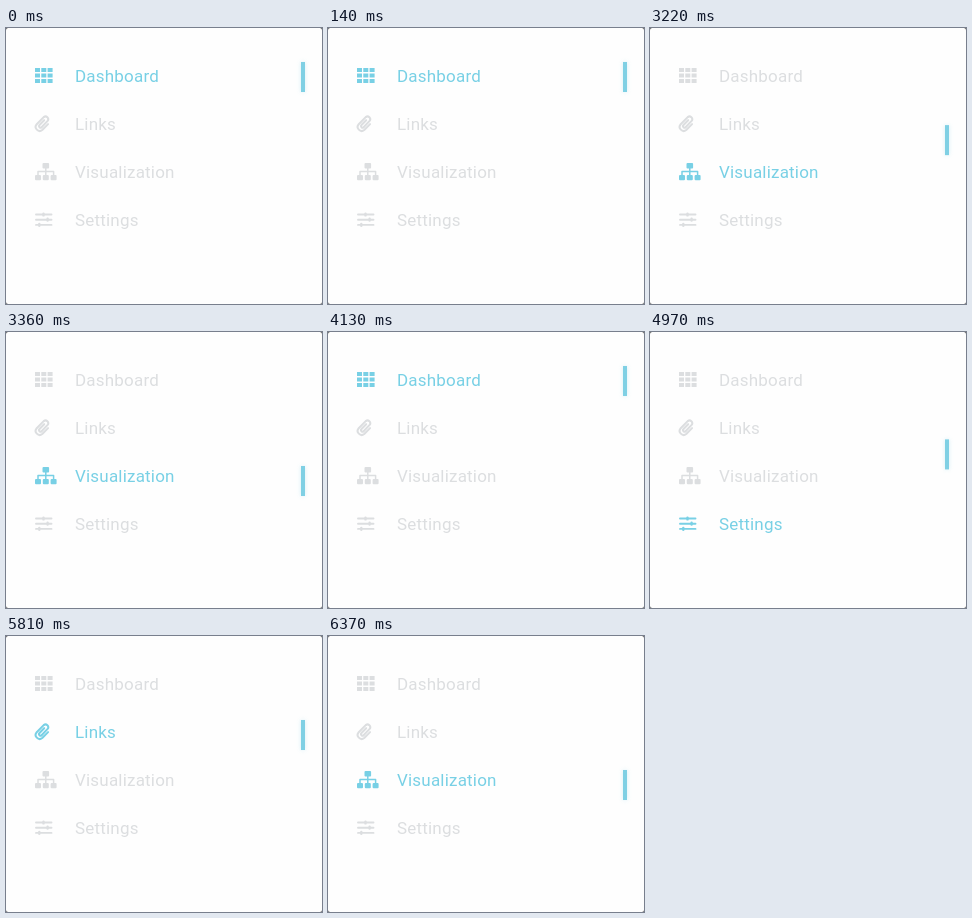
Recreate the animation shown at these times as an HTML page. Size 316 by 276 pixels, loop 7.49 s.

```html
<!DOCTYPE html>
<html lang="en">
<head>
<meta charset="utf-8">
<title>Menu</title>
<style>
  html, body { margin: 0; width: 100%; height: 100%; overflow: hidden; background: #666; }
  svg { display: block; width: 316px; height: 276px; }
  text { font: 17px Roboto, sans-serif; letter-spacing: .2px; }
  g { color: #dcdee0; fill: currentColor; }
  g.on { color: #78d0e5; }
  .line { fill: none; stroke: currentColor; stroke-width: 1.9; stroke-linecap: round; stroke-linejoin: round; }
  #bar { fill: #7fd0e4; filter: drop-shadow(0 0 2px #7fd0e455); }
</style>
</head>
<body>
<svg viewBox="0 0 316 276">
  <rect width="316" height="276" rx="2.5" fill="#fefefe"/>
  <g>
    <path d="M29 40h5v4h-5zm6.3 0h5v4h-5zm6.3 0h5v4h-5zM29 45.5h5v4h-5zm6.3 0h5v4h-5zm6.3 0h5v4h-5zM29 51h5v4h-5zm6.3 0h5v4h-5zm6.3 0h5v4h-5z"/>
    <text x="69" y="54">Dashboard</text>
  </g>
  <g>
    <path class="line" transform="translate(28.6 87.2) scale(1.06)" d="M12.7 8.4 7.2 14A3.8 3.8 0 0 1 2 8.5L8.6 1.8A2.6 2.6 0 0 1 12.3 5.4L6.6 11.3A1.4 1.4 0 0 1 4.6 9.3L9 4.7"/>
    <text x="69" y="102">Links</text>
  </g>
  <g>
    <rect x="36.5" y="135" width="6.6" height="5.5" rx="1"/>
    <rect x="29" y="147" width="6" height="5.2" rx="1"/>
    <rect x="36.8" y="147" width="6" height="5.2" rx="1"/>
    <rect x="44.6" y="147" width="6" height="5.2" rx="1"/>
    <path class="line" style="stroke-width:1.5" d="M39.8 140v7M32 147v-3.4h15.6v3.4"/>
    <text x="69" y="150">Visualization</text>
  </g>
  <g>
    <path class="line" d="M30 186.5h15.5M30 191.7h15.5M30 196.9h15.5"/>
    <path class="line" style="stroke-width:2.4" d="M37.5 185.6v1.8M41.6 190.8v1.8M33.3 196v1.8"/>
    <text x="69" y="198">Settings</text>
  </g>
  <rect id="bar" x="295" width="4" height="30"/>
</svg>
<script>
  const LOOP = 7490, TICK = 70, MOVE = 140;
  // [time of the switch, menu item, how long the bar has already been moving]
  const steps = [
    [0, 0, MOVE], [2450, 1, 69], [3220, 2, 47], [4060, 0, 69],
    [4970, 3, 69], [5670, 1, 47], [6230, 2, 47]
  ];
  const items = document.querySelectorAll('g');
  const bar = document.getElementById('bar');
  const barY = item => 34 + 50 * item;
  const ease = p => p * p * (3 - 2 * p);

  function draw(now) {
    const t = Math.floor(now % LOOP / TICK) * TICK;
    const i = steps.findLastIndex(s => s[0] <= t);
    const [start, item, lead] = steps[i];
    const from = barY(steps[Math.max(i - 1, 0)][1]);
    const p = ease(Math.min((t - start + lead) / MOVE, 1));
    bar.setAttribute('y', from + (barY(item) - from) * p);
    items.forEach((g, n) => g.classList.toggle('on', n === item));
    requestAnimationFrame(() => draw(performance.now()));
  }
  draw(0);
</script>
</body>
</html>
```
